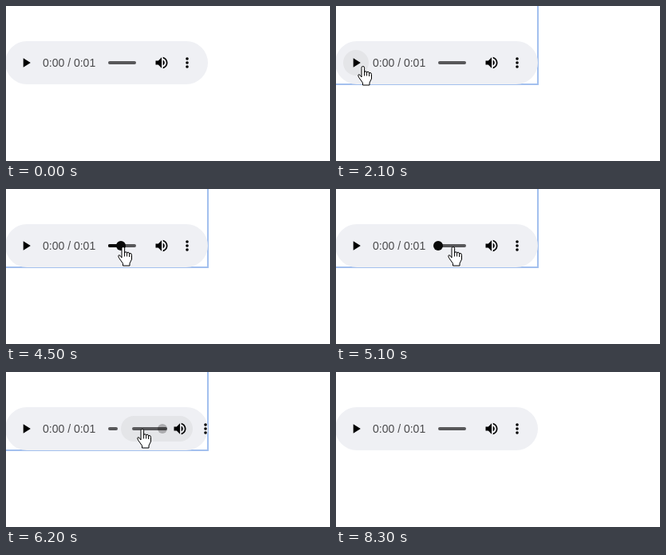
Recreate the animation shown at these times as an HTML page. Size 406 by 194 pixels, loop 8400 ms.

```html
<!DOCTYPE html>
<html lang="en">
<head>
<meta charset="utf-8">
<title>Audio player</title>
<style>
  html, body { margin: 0; width: 100%; height: 100%; overflow: hidden; background: #fff; }
  svg { display: block; }
  text { font: 14px "Liberation Sans", Arial, sans-serif; fill: #4a4a4c; }
  .track { fill: #58585a; }
  .hover { fill: #e4e5e8; }
  .cursor { fill: #fff; stroke: #000; stroke-linejoin: round; }
</style>
</head>
<body>
<svg width="406" height="194" viewBox="0 0 406 194">
  <path id="focus" d="M253 0V98H0" fill="none" stroke="#a3c0ee" stroke-width="2"/>
  <rect x="-1" y="44" width="254" height="54" rx="27" fill="#eff0f4"/>

  <circle id="playHover" class="hover" cx="25" cy="71" r="16"/>
  <path id="playIcon" transform="translate(15 61) scale(.8333)"/>
  <text id="clock" x="46" y="76"></text>

  <rect id="track" class="track" x="128" y="69" height="4" rx="2"/>
  <rect id="progress" x="128" y="69" height="4" rx="2" fill="#0a0a0a"/>
  <circle id="thumb" cy="71" r="6" fill="#0a0a0a"/>

  <rect id="panel" class="hover" y="55" height="32" rx="16"/>
  <rect id="slider" class="track" y="69" height="4" rx="2"/>
  <circle id="knob" cy="71" r="6" opacity=".25"/>
  <g id="rightIcons">
    <path transform="translate(185 61) scale(.8333)" d="M3 9v6h4l5 5V4L7 9H3zm13.5 3c0-1.77-1.02-3.29-2.5-4.03v8.05c1.48-.73 2.5-2.25 2.5-4.02zM14 3.23v2.06c2.89.86 5 3.54 5 6.71s-2.11 5.85-5 6.71v2.06c4.01-.91 7-4.49 7-8.77s-2.99-7.86-7-8.77z"/>
    <path d="M227 66v0m0 5v0m0 5v0" fill="none" stroke="#000" stroke-width="3.6" stroke-linecap="round"/>
  </g>

  <g id="cursor" class="cursor">
    <path id="arrow" d="M.5.5V16.5l3.7-3.6 2.8 5.8 2.5-1.2-2.8-5.5H11.5z"/>
    <path id="hand" d="M-1 14V2.300a1.800 1.800 0 0 1 3.600 0V8q0-1.200 1.500-1.200T5.600 8.200q.2-1 1.500-1T8.600 9.400q.2-.9 1.400-.9t1.500 2V16l-2.500 5v3h-8.500v-2.800l-5-7q-1.500-2.800 0-3.500 1.500-.2 3.500 3.300zM2.600 8v4.500M5.600 8v4.500M8.600 9v4"/>
  </g>
</svg>
<script>
const LOOP = 8400, STEP = 100;
const PLAY = "M8 5v14l11-7z", PAUSE = "M6 19h4V5H6zm8-14v14h4V5z";

// Pointer moves: start, end, target x, y; it rests in between
const moves = [
  [500, 1300, 47, 101], [1500, 2100, 33, 75],
  [3600, 4300, 160, 87], [4300, 4500, 146, 72],
  [5100, 5500, 188, 71], [5700, 6200, 170, 71],
  [6300, 6900, 127, 191], [6900, 7200, 134, 164], [7200, 7400, 105, 200]
];

const clamp = (v, low, high) => Math.min(high, Math.max(low, v));
const ramp = (t, from, to) => clamp((t - from) / (to - from), 0, 1);
const between = (t, from, to) => t >= from && t < to;

function pointerAt(t) {
  let x = 56, y = 200;
  for (const [from, to, endX, endY] of moves) {
    const k = ramp(t, from, to), eased = k * k * (3 - 2 * k);
    x += (endX - x) * eased;
    y += (endY - y) * eased;
  }
  // Scrub along the timeline and back
  x += 18 * Math.sin(2 * Math.PI * ramp(t, 4500, 5100));
  return [Math.round(x), Math.round(y)];
}

function progressAt(t, x) {
  if (!between(t, 2400, 5000)) return 0;
  if (t > 4500) return clamp(x - 130, 0, 35);
  return Math.min(16, 6 + 2.5 * Math.floor((t - 2400) / 200));
}

const el = id => document.getElementById(id);
const set = (id, attrs) => {
  for (const name in attrs) el(id).setAttribute(name, attrs[name]);
};
const show = (id, on) => set(id, { visibility: on ? "visible" : "hidden" });

function render(t) {
  const [x, y] = pointerAt(t);
  const fill = progressAt(t, x);
  const open = ramp(t, 5400, 5700) - ramp(t, 6300, 6600);
  const overPlayer = y < 98;

  show("focus", between(t, 2000, 8300));
  show("playHover", Math.hypot(x - 25, y - 71) < 17);
  const playing = between(t, 2400, 2600) || between(t, 3100, 3200);
  set("playIcon", { d: playing ? PAUSE : PLAY });
  el("clock").textContent = `0:0${fill > 30 ? 1 : 0} / 0:01`;

  set("track", { width: 35 - 23 * open });
  set("progress", { width: fill });
  set("thumb", { cx: 128 + fill });
  show("thumb", !open && x > 122 && x < 170 && Math.abs(y - 71) < 8);

  const left = 179 - 35 * open, right = 211 + 23 * open;
  const start = left + 14, end = right - 32;
  set("panel", { x: left, width: right - left });
  set("slider", { x: start, width: Math.max(0, end - start) });
  set("knob", { cx: end - 6 });
  show("panel", open > 0);
  show("slider", end > start);
  show("knob", end - start > 12);
  set("rightIcons", { transform: `translate(${23 * open} 0)` });

  set("cursor", { transform: `translate(${x} ${y})` });
  show("hand", overPlayer);
  show("arrow", !overPlayer);
}

function tick() {
  const t = performance.now() % LOOP;
  render(Math.floor(t / STEP) * STEP);
  requestAnimationFrame(tick);
}
tick();
</script>
</body>
</html>
```
